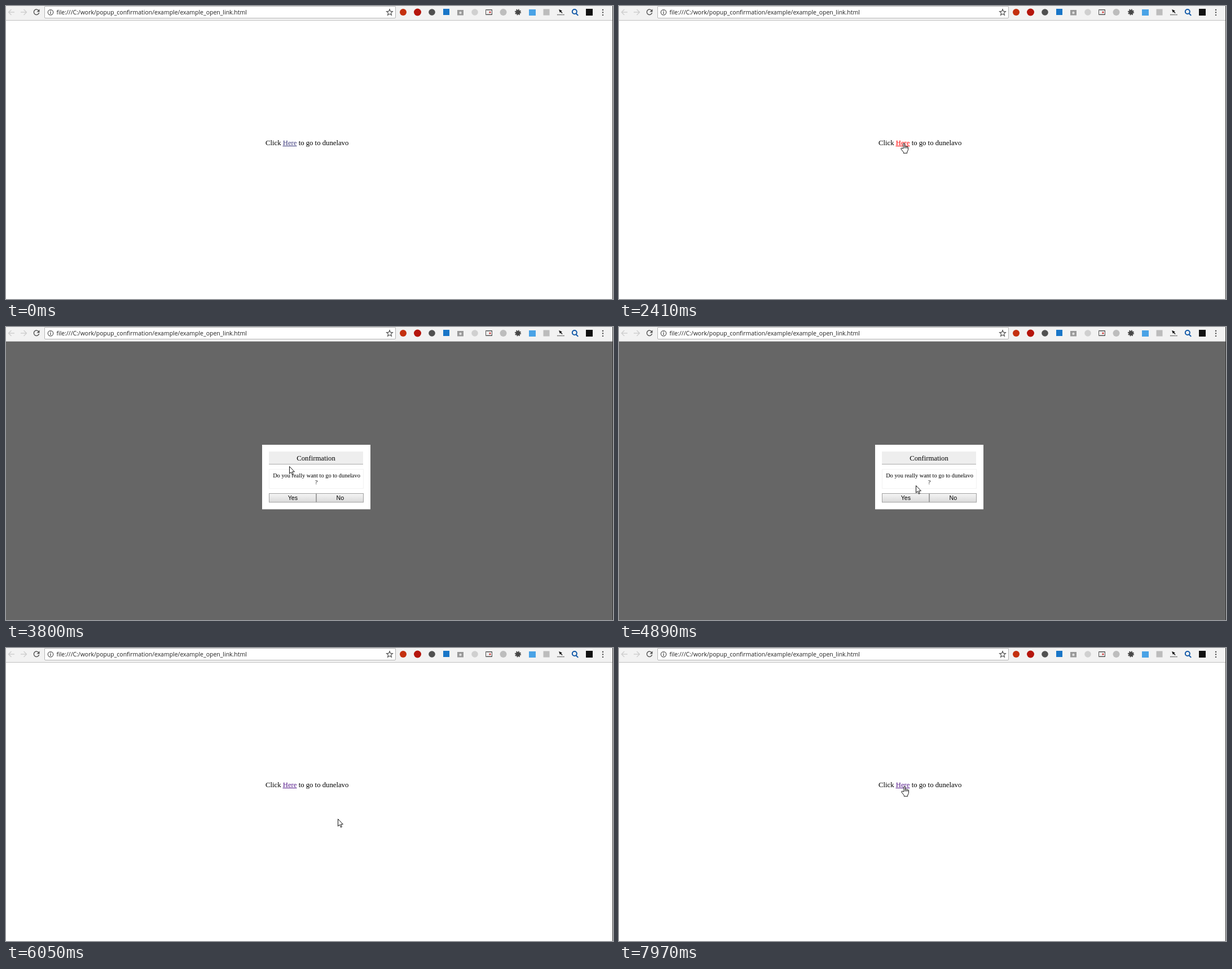
An HTML page for the animation above (8000 ms loop, 1076 px wide and 520 px high).

```html
<!DOCTYPE html>
<html lang="en">
<head>
<meta charset="utf-8">
<title>Popup confirmation</title>
<style>
  html, body { margin: 0; width: 100%; height: 100%; overflow: hidden; background: #fff; }
  svg { display: block; width: 1076px; height: 520px; }
  text { white-space: pre; }
  .page { font: 12.72px "Liberation Serif", serif; }
  .small { font-size: 10.38px; }
  .url { font: 10.46px "Open Sans", sans-serif; fill: #222; }
  .button { font: 10.6px "Liberation Sans", sans-serif; }
  .middle { text-anchor: middle; }
  .line { fill: none; stroke: #505050; stroke-width: 1.4; }
  .pointer { fill: #fff; stroke: #111; stroke-width: 1; stroke-linejoin: round; }
</style>
</head>
<body>
<svg viewBox="0 0 1076 520">
  <defs>
    <linearGradient id="raised" x2="0" y2="1">
      <stop stop-color="#f5f5f5"/><stop offset="1" stop-color="#dadada"/>
    </linearGradient>
    <linearGradient id="pressed" x2="0" y2="1">
      <stop stop-color="#dadada"/><stop offset="1" stop-color="#f5f5f5"/>
    </linearGradient>
  </defs>

  <g id="toolbar">
    <rect width="1076" height="25" fill="#f2f2f2"/>
    <rect y="25" width="1076" height="1" fill="#c0c0c0"/>
    <rect x="68.5" y=".5" width="622" height="21" rx="1.5" fill="#fff" stroke="#b4b4b4"/>
    <path class="line" style="stroke:#cfcfcf" d="M15 11H5M9.5 6l-5 5 5 5M26 11h10M31.500 6l5 5-5 5"/>
    <path class="line" d="M58 8.200A4.700 4.700 0 1 0 58.600 12"/>
    <path fill="#505050" d="M59.500 5.500v5h-5z"/>
    <circle class="line" cx="79" cy="11.300" r="4.700" style="stroke-width:1.200"/>
    <path class="line" d="M79 10.500V14M79 8.300v1.300"/>
    <text class="url" x="89.500" y="15">file:///C:/work/popup_confirmation/example/example_open_link.html</text>
    <path class="line" style="stroke-width:1.200" d="M680 5.800l1.500 3.600 3.900.4-3 2.600 1 3.800-3.400-2.100-3.400 2.100 1-3.800-3-2.600 3.900-.4z"/>
  </g>

  <g id="extensions">
    <circle cx="704" cy="11" r="6" fill="#c4300f"/>
    <circle cx="729.500" cy="11" r="6.500" fill="#b5150c"/>
    <circle cx="755" cy="11" r="5.800" fill="#505050"/>
    <rect x="775" y="5" width="11" height="11" fill="#1976c8"/>
    <path fill="#999" d="M800 7h11v9.500h-11z"/>
    <circle cx="805.500" cy="12" r="2.200" fill="#ddd"/>
    <circle cx="831" cy="11" r="5.800" fill="#d0d0d0"/>
    <path fill="#eee" stroke="#555" d="M850.500 6.500h11v9h-11z"/>
    <path stroke="#555" stroke-dasharray="1 1" d="M850 7.500h12M850 14.500h12"/>
    <circle cx="858" cy="11" r="1.600" fill="#c33"/>
    <circle cx="881.500" cy="11" r="6" fill="#bdbdbd"/>
    <circle cx="907.500" cy="11" r="4" fill="#484848"/>
    <circle cx="907.500" cy="11" r="4.600" fill="none" stroke="#484848" stroke-width="2" stroke-dasharray="1.800 1.800"/>
    <rect x="927" y="6" width="12" height="11" fill="#4aa3e6"/>
    <rect x="952.500" y="5.500" width="11" height="11" fill="#bcbcbc"/>
    <path fill="#111" d="M980 6l6 2.500-2 .7 2.500 2.800-1 1-2.500-2.800-1 1.800z"/>
    <path stroke="#555" stroke-width="1.500" stroke-dasharray="1.500 .7" d="M977 15.500h13"/>
    <path fill="none" stroke="#1259a8" stroke-width="2" d="M1010.500 13.200l3.700 3.700M1011.800 10a4 4 0 1 0-8 0 4 4 0 1 0 8 0"/>
    <rect x="1028" y="5" width="12" height="12" fill="#111"/>
    <path stroke="#505050" stroke-width="2.200" stroke-dasharray="2.200 2.400" d="M1058 5.700v12"/>
  </g>

  <text class="page" x="460" y="246.800">Click <tspan class="link">Here</tspan> to go to dunelavo</text>
  <rect class="link" x="490.500" y="248" width="25" height="1"/>

  <g id="popup">
    <rect y="26" width="1076" height="494" fill="#666"/>
    <rect x="454" y="209" width="192" height="114.500" fill="#fff"/>
    <rect x="466" y="221" width="167" height="22" fill="#eee"/>
    <rect x="466" y="243" width="167" height="1" fill="#aaa"/>
    <rect x="466.500" y="252.500" width="167" height="34" fill="none" stroke="#f2f2f2"/>
    <g class="page middle">
      <text x="549.500" y="236.500">Confirmation</text>
      <text class="small" x="550.500" y="267">Do you really want to go to dunelavo</text>
      <text class="small" x="550" y="279">?</text>
    </g>
    <g class="button middle">
      <rect x="466.500" y="295.500" width="83" height="15.500" fill="url(#raised)" stroke="#a0a0a0"/>
      <rect id="no" x="550.500" y="295.500" width="83" height="15.500" stroke="#a0a0a0"/>
      <text x="508.300" y="307">Yes</text>
      <text x="592.300" y="307">No</text>
    </g>
  </g>

  <rect x="1075" width="1" height="520" fill="#333"/>

  <g id="cursor">
    <circle id="click" r="9" fill="#f0ee22" opacity=".8"/>
    <path id="arrow" class="pointer" d="M.5.500V13.300L3.400 10.600 5.500 15.300 7.400 14.400 5.400 9.900H9.400z"/>
    <path id="hand" class="pointer" d="M0 10V1.800a1.200 1.200 0 0 1 2.400 0V6a1.200 1.200 0 0 1 2.200.3 1.200 1.200 0 0 1 2.100.5 1.100 1.100 0 0 1 1.800.9V12.500L6.700 16.200V18.200H.3V16.400L-4 11c-.8-1.600.8-2.600 2-1.500zM2.400 6V9.500M4.600 6.500V9.500M6.700 7V9.500"/>
  </g>
</svg>

<script>
const LOOP = 8000, TICK = 77.5, TICK_OFFSET = 13;

// Pointer path: [tick, x, y]
const path = [
  [2, 878, 482], [8, 591, 319], [10, 591, 319], [14, 588, 312], [15, 588, 311],
  [26, 504, 244], [27, 504, 243], [36, 504, 243], [38, 503, 243], [40, 502, 244],
  [42, 502, 245], [48, 502, 246], [49, 502, 247], [59, 484, 279], [60, 477, 281],
  [66, 575, 280], [69, 575, 280], [75, 589, 303], [77, 589, 303], [78, 588, 303],
  [81, 588, 303], [84, 585, 311], [87, 586, 315], [91, 586, 315], [102, 508, 247],
  [103, 505, 245]
];

const el = id => document.getElementById(id);
const show = (id, on) => el(id).style.display = on ? "" : "none";
const easeOut = u => u * (2 - u);
const easeInOut = u => u * u * (3 - 2 * u);

function pointerAt(tick) {
  const next = path.findIndex(p => p[0] > tick);
  if (next < 1) return path[next ? path.length - 1 : 0].slice(1);
  const [a, b] = [path[next - 1], path[next]];
  const u = (tick - a[0]) / (b[0] - a[0]);
  const e = next === 1 ? easeOut(u) : easeInOut(u);
  return [1, 2].map(i => Math.round(a[i] + (b[i] - a[i]) * e));
}

function draw() {
  const tick = Math.floor((performance.now() % LOOP + TICK_OFFSET) / TICK);
  const during = (from, to) => tick >= from && tick < to;
  const [x, y] = pointerAt(tick);
  const popup = during(32, 78);
  const noPressed = during(76, 78);
  const overLink = !popup && x > 490 && x < 516 && y < 250;
  const linkColor = during(29, 32) ? "#f00" : tick < 29 ? "#3c3a7c" : "#551a8b";

  show("popup", popup);
  show("cursor", tick >= 2);
  show("click", during(29, 31) || noPressed);
  show("hand", overLink);
  show("arrow", !overLink);
  el("cursor").setAttribute("transform", `translate(${x} ${y})`);
  document.querySelectorAll(".link").forEach(part => part.setAttribute("fill", linkColor));
  el("no").setAttribute("fill", `url(#${noPressed ? "pressed" : "raised"})`);
  requestAnimationFrame(draw);
}
draw();
</script>
</body>
</html>
```
